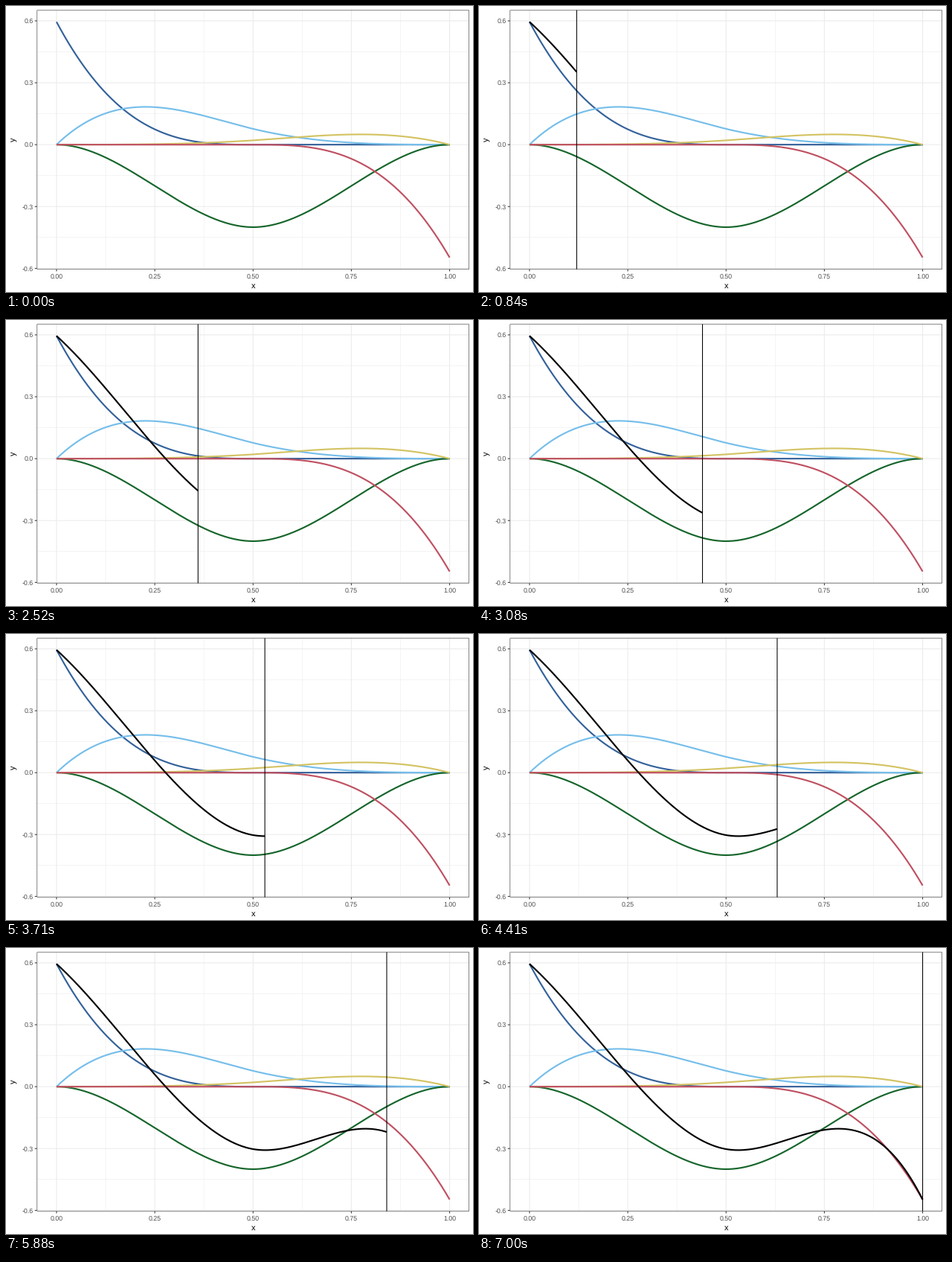
Recreate the animation shown at these times as a matplotlib script. Size 628 by 384 pixels, loop 7.07 s.

```python
import numpy as np
import matplotlib.pyplot as plt
from matplotlib.animation import FuncAnimation
from matplotlib.patches import Rectangle

W, H, DPI = 628, 384, 72
FRAMES, STEP_MS = 101, 70
LEFT, RIGHT, TOP, BOTTOM = 41.5, 623.0, 5.5, 353.5
COEFS = (0.595, 0.306, -0.8, 0.083, -0.547)
COLORS = ("#33619a", "#75beea", "#15652a", "#d3c362", "#bf5061")
X_LIM = (-0.05, 1.05)
PAD = 0.05 * (COEFS[0] - COEFS[-1])
Y_LIM = (COEFS[-1] - PAD, COEFS[0] + PAD)
THIN, THICK = 1.07, 2.13

plt.rcParams["font.family"] = "Liberation Sans"
plt.rcParams["text.hinting"] = "none"


def px(x):
    return LEFT + (x - X_LIM[0]) / (X_LIM[1] - X_LIM[0]) * (RIGHT - LEFT)


def py(y):
    return BOTTOM - (y - Y_LIM[0]) / (Y_LIM[1] - Y_LIM[0]) * (BOTTOM - TOP)


def basis(x):
    """Cubic B-splines on [0, 1] with one inner knot at 0.5."""
    def edge(t):
        return np.maximum(1 - 2 * t, 0) ** 3

    def inner(t):
        return np.where(t < 0.5, 2 * t * (7 * t**2 - 9 * t + 3), 2 * (1 - t) ** 3)

    near = np.minimum(x, 1 - x)
    middle = 2 * near**2 * (3 - 4 * near)
    return np.array([edge(x), inner(x), middle, inner(1 - x), edge(1 - x)])


fig = plt.figure(figsize=(W / DPI, H / DPI), dpi=DPI, facecolor="white")
ax = fig.add_axes([0, 0, 1, 1])
ax.set_xlim(0, W)
ax.set_ylim(H, 0)
ax.axis("off")


def line(xs, ys, color, width, z):
    return ax.plot(xs, ys, color=color, lw=width, zorder=z, snap=False,
                   solid_capstyle="butt")[0]


def v_grid(x, width):
    line([px(x)] * 2, [TOP, BOTTOM], "#ebebeb", width, 1)


def h_grid(y, width):
    line([LEFT, RIGHT], [py(y)] * 2, "#ebebeb", width, 1)


# Grid
for x in np.arange(0.125, 1, 0.25):
    v_grid(x, THIN / 2)
for y in (-0.45, -0.15, 0.15, 0.45):
    h_grid(y, THIN / 2)

# Major grid, ticks and tick labels
label = dict(fontsize=8.8, color="#4d4d4d", va="baseline")
for x in np.linspace(0, 1, 5):
    v_grid(x, THIN)
    line([px(x)] * 2, [BOTTOM, BOTTOM + 2.75], "#333333", THIN, 6)
    ax.text(px(x), 366, f"{x:.2f}", ha="center", **label)
for y in (-0.6, -0.3, 0.0, 0.3, 0.6):
    h_grid(y, THIN)
    line([LEFT - 2.75, LEFT], [py(y)] * 2, "#333333", THIN, 6)
    ax.text(LEFT - 4.95, py(y) + 3.15, f"{y:.1f}", ha="right", **label)

ax.text((LEFT + RIGHT) / 2, 379, "x", fontsize=11, ha="center", va="baseline")
ax.text(14, (TOP + BOTTOM) / 2, "y", fontsize=11, ha="center", va="baseline",
        rotation=90, rotation_mode="anchor")

# Weighted basis curves and their sum
grid = np.linspace(0, 1, 401)
parts = np.array(COEFS)[:, None] * basis(grid)
total = parts.sum(axis=0)
for part, color in zip(parts, COLORS):
    line(px(grid), py(part), color, THICK, 3)

sum_line = line([], [], "black", THICK, 4)
cursor = line([], [], "black", THIN, 5)

ax.add_patch(Rectangle((LEFT + 0.3, TOP + 0.3), RIGHT - LEFT - 0.6,
                       BOTTOM - TOP - 0.6, fill=False, ec="#333333", lw=0.6,
                       zorder=6, snap=False))


def update(i):
    if i == 0:
        sum_line.set_data([], [])
        cursor.set_data([], [])
    else:
        n = 4 * i + 1
        sum_line.set_data(px(grid[:n]), py(total[:n]))
        cursor.set_data([px(i / 100)] * 2, [TOP, BOTTOM])
    return sum_line, cursor


anim = FuncAnimation(fig, update, frames=FRAMES, interval=STEP_MS,
                     init_func=lambda: update(0), repeat=True, repeat_delay=0)
plt.show()
```
